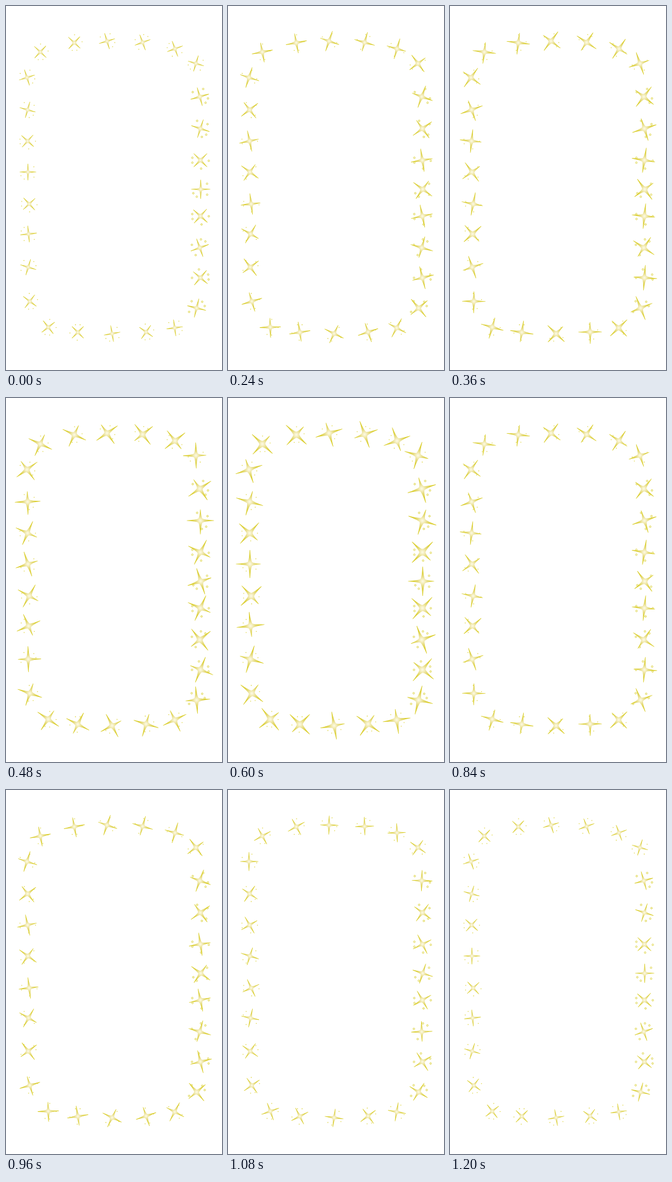
Animation, 340 px wide and 570 px high, one loop 1230 ms. Source, as an HTML page with a canvas:

```html
<!DOCTYPE html>
<html lang="en">
<head>
<meta charset="utf-8">
<title>Sparkle frame</title>
<style>
html, body { margin: 0; width: 100%; height: 100%; overflow: hidden; background: #fff; }
canvas { display: block; }
</style>
</head>
<body>
<canvas id="stage" width="340" height="570"></canvas>
<script>
const ctx = document.getElementById('stage').getContext('2d');
const STEP = 30, STEPS = 41, PEAK = 20;
const RAD = Math.PI / 180;

// x, y, angle in degrees; clockwise from the top left
const stars = [
  [54, 72, 43], [107.5, 57.5, 43], [159, 55, -17], [215, 57, 250], [266, 67, 160], [299, 90, 107],
  [305, 142, -16], [306, 192, 18], [306, 241.5, 135], [306.5, 287, 90],
  [306, 329, 132], [305, 378.5, 250], [306, 425.5, 310], [300, 473, 284],
  [265.5, 504, -8], [220.5, 510.5, 35], [167, 513, 80], [113, 511, 225], [66.5, 503, 52],
  [37.5, 462.5, 37], [35, 409, 287], [35.5, 357, 174], [36.5, 310, 137], [34.5, 260, 90],
  [34, 211.5, 132], [34, 162.5, 16], [33, 112, -18]
];
const DOTS = [28, 62, -50, -131];

const lerp = (a, b, k) => a + (b - a) * k;
const isBig = i => i >= 6 && i <= 13;

function drawStar(x, y, angle, long, short) {
  const glow = ctx.createRadialGradient(0, 0, 0, 0, 0, long);
  glow.addColorStop(0, '#fdfbe6');
  glow.addColorStop(0.16, '#f3ecba');
  glow.addColorStop(0.34, '#e6dc80');
  glow.addColorStop(0.6, '#dcd038');
  glow.addColorStop(1, '#d6c810');
  ctx.save();
  ctx.translate(x, y);
  ctx.rotate(angle * RAD);
  ctx.fillStyle = glow;
  const w = long * 0.15;
  for (let n = 0; n < 4; n++) {
    const len = n ? long : short;
    ctx.beginPath();
    ctx.moveTo(0, 0);
    ctx.lineTo(-w, -w);
    ctx.quadraticCurveTo(-0.06 * long, -0.3 * len, -0.3, -len);
    ctx.lineTo(0.3, -len);
    ctx.quadraticCurveTo(0.06 * long, -0.3 * len, w, -w);
    ctx.closePath();
    ctx.fill();
    ctx.rotate(Math.PI / 2);
  }
  ctx.fillRect(-w, -w, 2 * w, 2 * w);
  ctx.restore();
}

function drawDots(x, y, angle, big) {
  const dist = big ? 13.2 : 12.4;
  for (const d of DOTS) {
    const a = (angle + d) * RAD;
    const px = x + dist * Math.cos(a), py = y + dist * Math.sin(a);
    ctx.beginPath();
    ctx.arc(px, py, big ? 1.3 : 0.8, 0, 2 * Math.PI);
    if (big) {
      ctx.strokeStyle = '#dcd23c';
      ctx.lineWidth = 0.9;
      ctx.stroke();
    } else {
      ctx.fillStyle = '#e2da58';
      ctx.fill();
    }
  }
}

function draw(now) {
  const step = Math.floor(now / STEP) % STEPS;
  const k = 1 - Math.abs(step - PEAK) / PEAK;
  ctx.fillStyle = '#fff';
  ctx.fillRect(0, 0, 340, 570);
  stars.forEach(([x, y, angle], i) => {
    const big = isBig(i);
    const long = big ? lerp(15, 23, k) : lerp(13, 22, k);
    const short = big ? lerp(15, 18, k) : lerp(13, 17, k);
    drawDots(x, y, angle, big);
    drawStar(x, y, angle + 90 * (k - 1), long, short);
  });
}

const start = performance.now();
function tick() {
  draw(performance.now() - start);
  requestAnimationFrame(tick);
}
tick();
</script>
</body>
</html>
```
